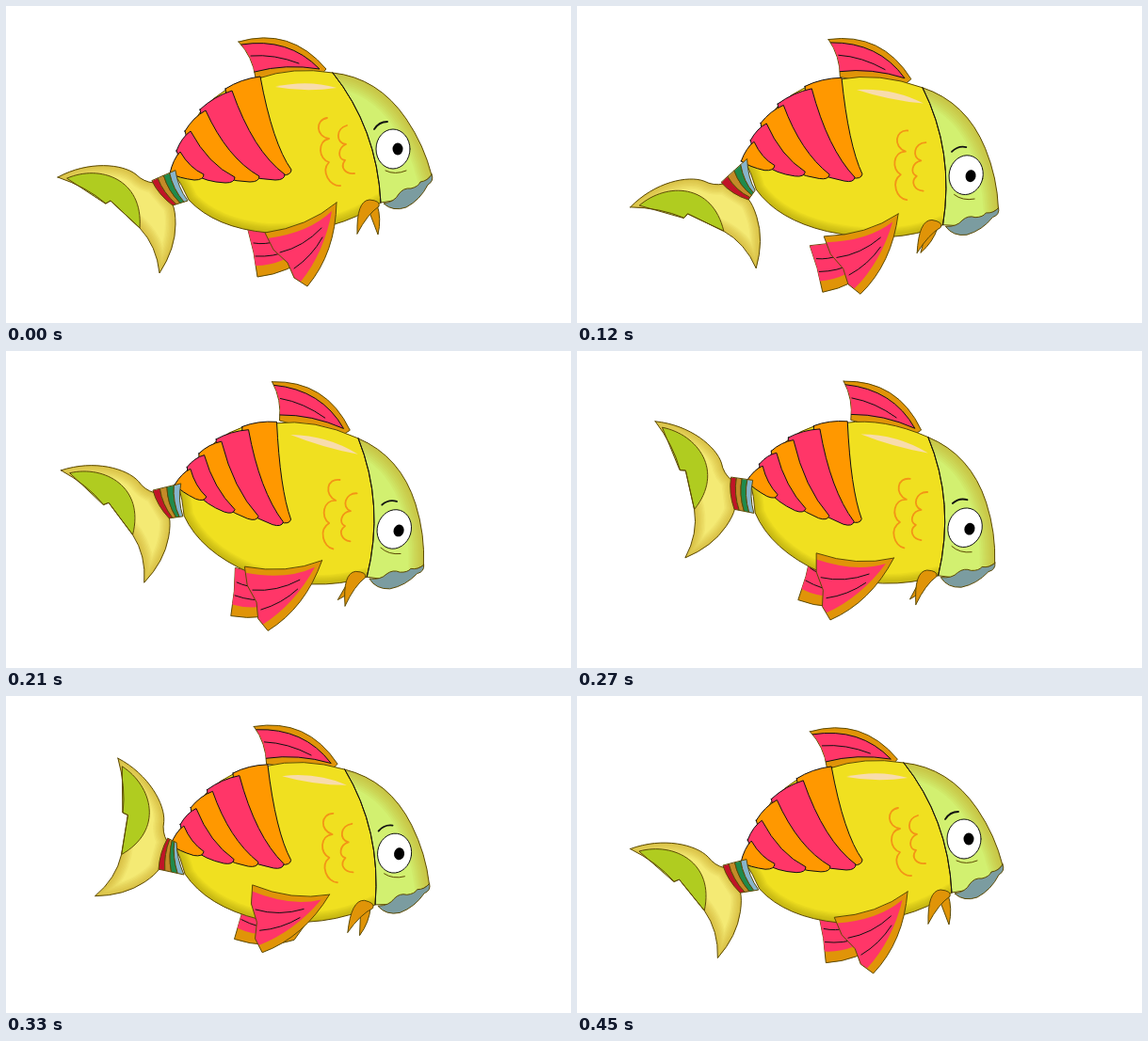
Animation of 600x337 px, one loop 480 ms. Source, as an HTML page with a canvas:

```html
<!DOCTYPE html>
<html lang="en">
<head>
<meta charset="utf-8">
<title>Swimming fish</title>
<style>
  html, body { margin: 0; width: 100%; height: 100%; overflow: hidden; background: #fff; }
  canvas { display: block; }
</style>
</head>
<body>
<canvas id="stage" width="600" height="337"></canvas>
<script>
const ctx = document.getElementById('stage').getContext('2d');
const LOOP = 480, STEP = 30;
const YELLOW = '#f0e020', ORANGE = '#ff9800', FIN = '#e09408', PINK = '#ff3668';
const OLIVE = '#8c7a08', OCHRE = '#b48c10', BLACK = '#111', BROWN = '#5c4a04';

// Pose channels, keyed at KEY_TIMES and looped.
const KEY_TIMES = [0, 120, 180, 270, 330, 390, 450];
const CHANNELS = {
  front: [0, 12, 16.1, 16.3, 7.7, 2.6, 0],
  rear: [0, 7.8, 16, 20, 9, 3.7, 0.5],
  dx: [0, -1, -1.5, -2, -1, -1, 0],
  dy: [0, 4, 4, 3.5, 0, -1.5, 0],
  tailX: [165, 166.4, 163.8, 165, 167, 166.6, 163.3],
  tailY: [198, 196.2, 171.4, 150, 166.4, 178.8, 193.7],
  tail: [0, -17.4, -1.1, 34.3, 56.1, 48.7, 8],
  finX: [351, 341, 336, 336, 343, 348, 351],
  finY: [210, 222, 224, 221, 212, 209, 209],
  fin: [0, 6, 14, 26.5, 30, 23, 3.5],
  backFin: [0, -4, 10, 27, 25, 18, 3]
};

const clamp = v => Math.max(0, Math.min(1, v));
const mix = (a, b, f) => [a[0] + (b[0] - a[0]) * f, a[1] + (b[1] - a[1]) * f];

function sample(values, t) {
  const n = KEY_TIMES.length;
  const time = i => KEY_TIMES[(i + n) % n] + Math.floor(i / n) * LOOP;
  const value = i => values[(i + n) % n];
  const slope = i => (value(i + 1) - value(i - 1)) / (time(i + 1) - time(i - 1));
  let i = n - 1;
  while (KEY_TIMES[i] > t) i--;
  const span = time(i + 1) - time(i), u = (t - time(i)) / span, w = 1 - u;
  return value(i) * w * w * (1 + 2 * u) + value(i + 1) * u * u * (3 - 2 * u)
    + span * u * w * (slope(i) * w - slope(i + 1) * u);
}

function turn(x, y, cx, cy, degrees) {
  const a = degrees * Math.PI / 180, c = Math.cos(a), s = Math.sin(a);
  return [cx + (x - cx) * c - (y - cy) * s, cy + (x - cx) * s + (y - cy) * c];
}

// Rigid motion: turn about a rest pivot, then carry the pivot to (px, py).
const rigid = (cx, cy, degrees, px, py) => (x, y) => {
  const p = turn(x, y, cx, cy, degrees);
  return [p[0] + px - cx, p[1] + py - cy];
};

// Path text whose "x,y" pairs are moved by a function.
const shape = (d, move) => new Path2D(
  d.replace(/(-?[\d.]+),(-?[\d.]+)/g, (_, x, y) => move(+x, +y).join(' ')));

function paint(path, fill, line, width = 1) {
  if (fill) { ctx.fillStyle = fill; ctx.fill(path); }
  if (line) { ctx.strokeStyle = line; ctx.lineWidth = width; ctx.stroke(path); }
}

// Soft shade along a line, kept inside a shape.
function shade(inside, line, color, size) {
  ctx.save();
  ctx.clip(inside);
  ctx.globalAlpha = 0.07;
  for (let i = 1; i <= 8; i++) paint(line, null, color, size * i / 4);
  ctx.restore();
}

function drawTail(move) {
  const outer = shape('M55,182 C88,164 124,168 138,179 Q146,187 157,188 L177,211 Q180,218 180,232 Q180,258 163,284 Q160,255 142,236 L111,207 L106,210 Q85,192 55,182Z', move);
  paint(outer, '#f4ea74');
  shade(outer, outer, OCHRE, 11);
  paint(shape('M65,183 C100,168 146,184 142,236 L111,207 L106,210Z', move), '#b0cc20', BROWN);
  paint(outer, null, BROWN);
}

function drawBands(tailMove, bodyMove) {
  const top = [tailMove(155, 186), bodyMove(180, 175)];
  const bottom = [tailMove(177, 212), bodyMove(193, 207)];
  const edge = f => {
    const a = mix(...top, f), b = mix(...bottom, f);
    const c = mix(mix(...top, f - 0.2), mix(...bottom, f - 0.2), 0.5);
    return { a, b, c };
  };
  ['#c01428', '#c48a28', '#1f8a4c', '#86b4cc'].forEach((color, i) => {
    const l = edge(i / 4), r = edge((i + 1) / 4);
    paint(new Path2D(`M${l.a} Q${l.c} ${l.b} L${r.b} Q${r.c} ${r.a}Z`), color, BROWN);
  });
}

function drawStripes(move) {
  // left top, right top, tip
  const stripes = [
    [233, 88, 270, 75, 303, 174],
    [206, 110, 240, 90, 296, 179],
    [190, 133, 212, 111, 269, 181],
    [181, 154, 196, 133, 243, 182],
    [174, 178, 185, 155, 210, 179]
  ];
  stripes.forEach(([lx, ly, rx, ry, tx, ty], i) => {
    const d = `M${lx},${ly} Q${(lx + rx) / 2 - 2},${(ly + ry) / 2 - 4} ${rx},${ry}`
      + ` Q${rx + (tx - rx) * 0.4},${ry + (ty - ry) * 0.72} ${tx},${ty}`
      + ` Q${tx},${ty + 6} ${tx - 10},${ty + 6} Q${lx + 10},${ty + 4} ${lx},${ly}Z`;
    paint(shape(d, move), i % 2 ? PINK : ORANGE, BLACK);
  });
}

function drawBackFin(move) {
  paint(shape('M257,238 L263,262 L265,275 L267,288 Q302,284 325,262 L330,235Z', move), FIN, BROWN);
  paint(shape('M257,238 L263,262 L265,276 Q295,276 322,252 L330,235Z', move), PINK);
  paint(shape('M265,266 Q285,267 300,260 M263,252 Q275,254 288,250', move), null, BLACK);
}

function drawFrontFin(move) {
  const outer = shape('M351,209 Q320,235 275,241 L284,259 L299,273 L306,289 L320,298 Q350,262 351,209Z', move);
  paint(outer, FIN);
  paint(shape('M346,218 Q322,241 278,247 L284,259 L299,273 L306,289 L313,293 Q338,262 346,218Z', move), PINK);
  paint(shape('M335,236 Q316,256 291,262 M336,246 Q325,266 306,279', move), null, BLACK);
  paint(outer, null, BROWN);
}

function drawDorsal(move) {
  paint(shape('M245,38 Q300,22 338,67 L330,76 L263,76 Q260,54 245,38Z', move), FIN, BROWN);
  paint(shape('M248,41 Q298,33 331,67 Q295,62 262,70 Q259,54 248,41Z', move), PINK);
  paint(shape('M248,41 Q298,33 331,67 Q295,61 262,70 M258,53 Q283,51 309,61', move), null, BLACK);
}

function drawBody(move) {
  const body = shape('M178,177 L175,176 Q184,150 206,113 Q232,82 268,77 Q305,64 347,71 Q394,130 398,209 Q350,242 278,241 Q222,236 194,206 Q187,190 178,177Z', move);
  const belly = shape('M178,177 Q187,190 194,206 Q222,236 278,241 Q350,242 398,209', move);
  paint(body, YELLOW);
  shade(body, belly, OLIVE, 10);
  paint(body, null, BROWN);
  drawStripes(move);
  paint(shape('M286,86 Q320,78 351,87 Q318,92 286,86Z', move), '#f8dcac');
  paint(shape('M341,119 C328,121 329,139 343,141 C330,144 332,163 343,166 C334,176 344,192 355,191 M362,127 C350,130 350,146 361,147 C352,151 352,163 360,164 C354,172 361,179 370,178', move), null, '#f39416', 1.8);
}

function drawHead(move, angle) {
  const head = shape('M347,71 Q394,130 398,209 Q426,208 452,180 Q444,148 425,120 Q395,76 347,71Z', move);
  const brow = shape('M347,71 Q395,76 425,120 Q444,148 452,180', move);
  paint(head, '#d2f070');
  shade(head, brow, OCHRE, 16);
  paint(head, null, BROWN);
  paint(shape('M347,71 Q394,130 398,209', move), null, BLACK);
  paint(shape('M452,179 Q455,186 448,190 Q440,206 425,214 Q411,219 401,210 Q413,208 417,200 Q422,193 430,194 Q438,192 440,187 Q448,186 452,179Z', move), '#7b9ca0', BROWN);

  const oval = (x, y, rx, ry) => {
    const p = new Path2D();
    p.ellipse(...move(x, y), rx, ry, angle * Math.PI / 180, 0, 7);
    return p;
  };
  paint(oval(411, 152, 18, 21), '#fff', BLACK);
  paint(oval(416, 152, 5.5, 6.5), '#000');
  paint(shape('M391,131 Q396,123 405,123', move), null, BLACK, 1.8);
  paint(shape('M403,175 Q413,180 425,175', move), null, BROWN);
}

function drawChinFins(move, angle) {
  const sway = extra => (x, y) => move(...turn(x, y, 388, 210, extra));
  paint(shape('M387,222 L395,243 Q399,226 394,211Z', sway(angle * 2)), FIN, BROWN);
  paint(shape('M373,242 Q372,207 386,206 Q398,207 396,213 Q384,221 373,242Z',
    sway(-2.5 * Math.max(0, angle - 9))), FIN, BROWN);
}

function draw(t) {
  const pose = {};
  for (const name in CHANNELS) pose[name] = sample(CHANNELS[name], t);
  const { front, rear, dx, dy, finX, finY } = pose;

  // The body bends between rear and front angles; its upper back turns less.
  const bend = (x, y) => {
    const angle = rear + (front - rear) * clamp((x - 190) / 110);
    const slack = 0.4 * clamp((165 - y) / 88) * clamp((350 - x) / 60);
    const p = turn(x, y, 300, 179, angle * (1 - slack));
    return [p[0] + dx, p[1] + dy];
  };
  const tailMove = rigid(165, 198, pose.tail, pose.tailX, pose.tailY);

  ctx.fillStyle = '#fff';
  ctx.fillRect(0, 0, 600, 337);
  ctx.lineJoin = ctx.lineCap = 'round';
  drawBackFin(rigid(330, 235, pose.backFin, finX - 21, finY + 25));
  drawTail(tailMove);
  drawDorsal(rigid(300, 179, front * 0.45 + rear * 0.38, 302 + dx, 179 + dy));
  drawBody(bend);
  drawBands(tailMove, bend);
  drawHead(bend, front);
  drawChinFins(bend, front);
  drawFrontFin(rigid(351, 210, pose.fin, finX, finY));
}

const start = performance.now();
function tick() {
  const t = (performance.now() - start) % LOOP;
  draw(Math.floor(t / STEP) * STEP);
  requestAnimationFrame(tick);
}
tick();
</script>
</body>
</html>
```
